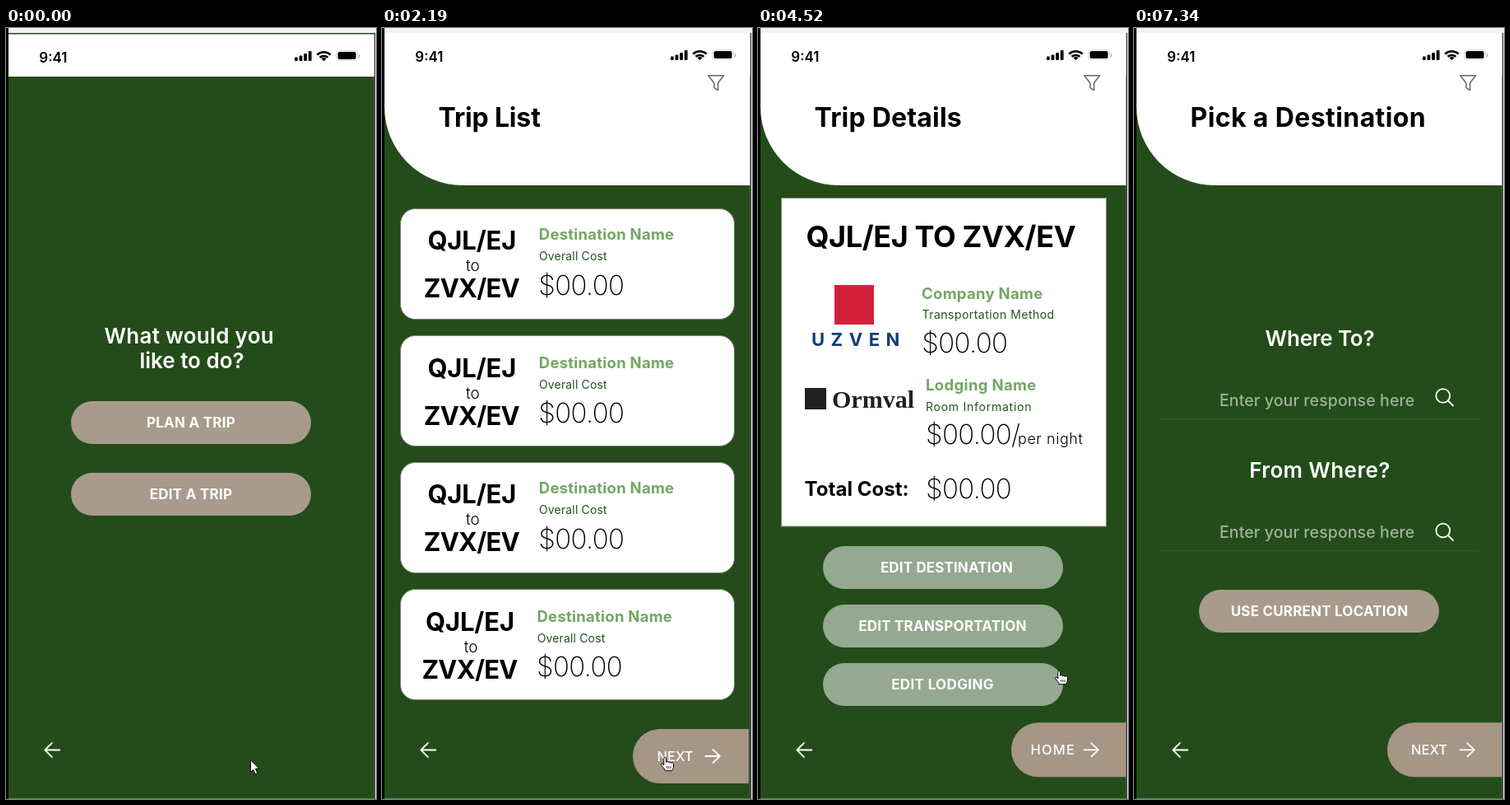
An HTML page that plays this animation: 450 by 936 pixels, repeating every 7900 ms.

```html
<!DOCTYPE html>
<html lang="en">
<head>
<meta charset="utf-8">
<title>Trip planner</title>
<style>
html, body { margin: 0; width: 100%; height: 100%; overflow: hidden; background: #fff; }
svg { display: block; width: 100vw; height: 100vh; }
text { font-family: Inter, "Open Sans", sans-serif; white-space: pre; }
.serif { font-family: "Liberation Serif", serif; }
</style>
</head>
<body>
<svg id="stage" viewBox="0 0 450 936"></svg>
<script>
const LOOP = 7900;
const GREEN = '#244c1a', TAN = '#a59686', SAGE = '#96a891', LEAF = '#72a763', DEEP = '#1f541c';
const FROM = 'QJL/EJ', TO = 'ZVX/EV';

const rect = (x, y, w, h, fill, extra = '') =>
  `<rect x="${x}" y="${y}" width="${w}" height="${h}" fill="${fill}" ${extra}/>`;

const line = (d, color = '#fff', width = 1.8) =>
  `<path d="${d}" fill="none" stroke="${color}" stroke-width="${width}" stroke-linecap="round" stroke-linejoin="round"/>`;

const text = (x, y, str, size, weight, fill = '#000', gap = 0, anchor = 'start', cls = '') =>
  `<text x="${x}" y="${y}" font-size="${size}" font-weight="${weight}" fill="${fill}" letter-spacing="${gap}" text-anchor="${anchor}" class="${cls}">${str}</text>`;

const middle = (x, y, str, size, weight, fill, gap) => text(x, y, str, size, weight, fill, gap, 'middle');

const heading = (x, y, str, gap) => middle(x, y, str, 26, 600, '#fff', gap);

const pill = (y, label, fill, gap = 0.25, x = 225) =>
  rect(79, y, 292, 52, fill, 'rx="26"') + middle(x, y + 32, label, 17, 700, '#fff', gap);

const label = (x, y, str, gap) => text(x, y, str, 18.5, 700, LEAF, gap);
const note = (x, y, str, gap) => text(x, y, str, 14, 400, DEEP, gap);
const price = (x, y, str = '$00.00') => text(x, y, str, 33, 200, '#000', -0.6);

const backArrow = () => line('M65.3 876.5H47.6M56 867.8L47.4 876.5L56 885.2');

function nextButton(x, y, right, caption, textX, gap) {
  const cy = y + 33, ax = x + 88.5;
  return `<path d="M${right} ${y}H${x + 33}a33 33 0 0 0 0 66H${right}Z" fill="${TAN}"/>` +
    text(textX, cy + 6, caption, 16.5, 500, '#fff', gap) +
    line(`M${ax} ${cy}h17M${ax + 9} ${cy - 8}l8.4 8l-8.4 8`);
}

function statusBar(dy) {
  const bars = [4.5, 6.5, 9, 12]
    .map((h, i) => rect(351 + i * 5.6, 39 - h, 3.8, h, '#000', 'rx="1"')).join('');
  return `<g transform="translate(0 ${dy})">` + text(40.3, 40.5, '9:41', 17, 600) + bars +
    '<path d="M378.3 31.4a12.2 12.2 0 0 1 16.4 0M381.6 34.8a7.6 7.6 0 0 1 9.8 0" fill="none" stroke="#000" stroke-width="2.7"/>' +
    '<path d="M386.5 39.2l-3-3a4.6 4.6 0 0 1 6 0Z"/>' +
    rect(402, 26.5, 25.5, 12, 'none', 'rx="3.5" stroke="#ccc" stroke-width=".8"') +
    rect(403.6, 28, 22, 9, '#000', 'rx="2"') +
    rect(429, 31, 1.2, 4, '#aaa') + '</g>';
}

const header = (title, gap) =>
  '<path d="M3 6H448V191H98A95 95 0 0 1 3 96Z" fill="#fff"/>' + statusBar(0) +
  line('M396.8 57.7H415.6L408.6 66.8V75.6L404 72.6V66.8Z', '#666', 1.5) +
  text(68.5, 120, title, 32, 700, '#000', gap);

const backdrop = () => rect(3, 6, 445, 930, GREEN);

function tripCard(i) {
  const dx = i === 3 ? -2.3 : 0, dy = [0, 155.5, 308.3, 463.5][i];
  return rect(22.5, 219.5 + i * 154, 406, 134, '#fff', 'rx="18" stroke="#7c8378"') +
    `<g transform="translate(${dx} ${dy})">` +
    middle(109.3, 268.5, FROM, 31, 700, '#000', -0.15) +
    middle(110.5, 294.5, 'to', 19, 300) +
    middle(108.9, 326.5, TO, 31, 700, '#000', -0.75) +
    label(190.8, 257, 'Destination Name', 0.25) +
    note(191, 282, 'Overall Cost', 0.15) +
    price(190.3, 323.5) + '</g>';
}

function searchField(y, title, gap, lensY) {
  return heading(226, y, title, gap) +
    text(104, y + 72.5, 'Enter your response here', 19.5, 500, '#a0b299', 0.1) +
    rect(32, y + 88, 387, 1.2, '#36592d') +
    `<circle cx="375.8" cy="${lensY}" r="8.4" fill="none" stroke="#fff" stroke-width="1.8"/>` +
    line(`M382 ${lensY + 6}l6 6`);
}

const menu = () => backdrop() + rect(3, 7.5, 445, 51.5, '#fff') + statusBar(1) +
  heading(222.7, 383, 'What would you', 0.3) + heading(226, 413, 'like to do?', 0) +
  pill(453, 'PLAN A TRIP', '#a89b8b') + pill(540, 'EDIT A TRIP', '#a89b8b') + backArrow();

const list = () => backdrop() + header('Trip List', -0.15) +
  [0, 1, 2, 3].map(tripCard).join('') + backArrow() +
  nextButton(305, 851, 446, 'NEXT', 334.5, 0);

const details = () => backdrop() + header('Trip Details', 0.2) +
  rect(28.5, 206.5, 395, 398.5, '#fff', 'stroke="#85917f"') +
  text(58.5, 266, `${FROM} TO ${TO}`, 36, 700, '#000', -0.4) +
  rect(93, 312, 48, 48, '#d4213b') +
  text(65, 386, 'UZVEN', 22, 700, '#0b3f7a', 7.5) +
  label(199, 329, 'Company Name', 0.3) +
  note(199.5, 353, 'Transportation Method', 0.47) +
  price(199.3, 394) +
  rect(57, 437, 26, 26, '#231f20') +
  text(90, 461, 'Ormval', 30, 700, '#231f20', 0, 'start', 'serif') +
  label(204, 440, 'Lodging Name', 0.35) +
  note(204, 465, 'Room Information', 0.75) +
  price(204, 505, '$00.00/') +
  text(316, 505, 'per night', 18, 300, '#000', 0.55) +
  text(56.5, 568, 'Total Cost:', 24, 700, '#000', 0.05) +
  price(204, 571) +
  pill(629, 'EDIT DESTINATION', SAGE, 0.15, 229.5) +
  pill(700, 'EDIT TRANSPORTATION', SAGE, 0.2, 224.5) +
  pill(771, 'EDIT LODGING', SAGE, 0.35, 224.5) + backArrow() +
  nextButton(308, 843.3, 448, 'HOME', 331.5, 1.2);

const picker = () => backdrop() + header('Pick a Destination', 0.4) +
  searchField(386, 'Where To?', -0.2, 446.5) + searchField(546, 'From Where?', 0.4, 610) +
  pill(682, 'USE CURRENT LOCATION', '#a89b8b', 0.2, 225.5) + backArrow() +
  nextButton(308, 843.3, 448, 'NEXT', 337, 0);

// Bezel lines around the phone screen
const bezel = () => rect(0, 0, 450, 6, '#f3f3f3') + rect(0, 0, 3, 936, '#000') +
  rect(447.5, 59, 1, 877, '#717d6d') + rect(448, 6, 1, 930, '#222') +
  rect(449, 0, 1, 936, '#eee') + rect(3, 935, 445, 1, '#647a5d');

const cursors = () => '<g id="cursor" stroke="#000" stroke-linejoin="round" fill="#fff">' +
  '<path id="arrow" d="M.5.5V15.4L3.8 12.3L6.3 17.8L8.8 16.7L6.4 11.3H10.8Z"/>' +
  '<g id="hand"><path d="M-1.2 10V1.8C-1.2 0 1.6 0 1.6 1.8V6.4C2.2 5 4.4 5.3 4.5 6.8C5.2 5.7 7.2 6 7.4 7.4C8.5 6.4 10.3 7 10.5 8.4V12C10.5 14 9 14.5 8.8 16.7H.4C.2 14.6-2.2 12.9-4.2 9.9C-4.9 8.4-3.2 7.3-2.1 8.7Z"/>' +
  '<path d="M2.6 11.2V14M4.8 11.2V14M7 11.2V14" fill="none" stroke-width=".8"/></g></g>';

// time, tip x, tip y, hand pointer?
const moves = [
  [0, 297, 888], [150, 271, 648], [290, 277, 564, 1], [430, 276, 563, 1], [580, 261, 567, 1],
  [980, 261, 567], [1460, 246, 590], [1610, 250, 648], [1760, 275, 732], [1880, 303, 813],
  [2040, 334, 873, 1], [2190, 344, 885, 1], [2350, 349, 885, 1], [2620, 349, 885], [2860, 349, 885, 1],
  [4520, 366, 780, 1], [4640, 364, 725, 1], [4780, 346, 688], [4900, 334, 663, 1],
  [5300, 326, 658, 1], [5830, 325, 658, 1], [6830, 325, 658], [6950, 345, 740],
  [7070, 395, 860], [7190, 424, 930], [7340, 470, 960]
];

// Each dissolve advances in 120 ms ticks from its first visible step
const fades = [
  { id: 'list', first: 980, lead: 40 },
  { id: 'details', first: 2620, lead: 70 },
  { id: 'picker', first: 6830, lead: 40 }
];

const $ = id => document.getElementById(id);
const screen = (id, body) => `<g id="${id}">${body}</g>`;

$('stage').innerHTML = rect(0, 0, 450, 936, '#fff') + screen('menu', menu()) +
  screen('list', list()) + screen('details', details()) + screen('picker', picker()) +
  bezel() + cursors();

function fadeAt(t, { first, lead }) {
  if (t < first) return 0;
  const p = Math.min(1, (Math.floor((t - first) / 120) * 120 + lead) / 300);
  return p > 0.9 ? 1 : 1 - (1 - p) ** 1.8;
}

function render(t) {
  for (const f of fades) {
    const a = fadeAt(t, f);
    $(f.id).setAttribute('opacity', a);
    $(f.id).setAttribute('display', a ? 'inline' : 'none');
  }
  const [, x, y, hand] = moves.filter(m => m[0] <= t).pop();
  $('cursor').setAttribute('transform', `translate(${x} ${y})`);
  $('arrow').setAttribute('display', hand ? 'none' : 'inline');
  $('hand').setAttribute('display', hand ? 'inline' : 'none');
}

const start = performance.now();
function tick() {
  render((performance.now() - start) % LOOP);
  requestAnimationFrame(tick);
}
tick();
</script>
</body>
</html>
```
